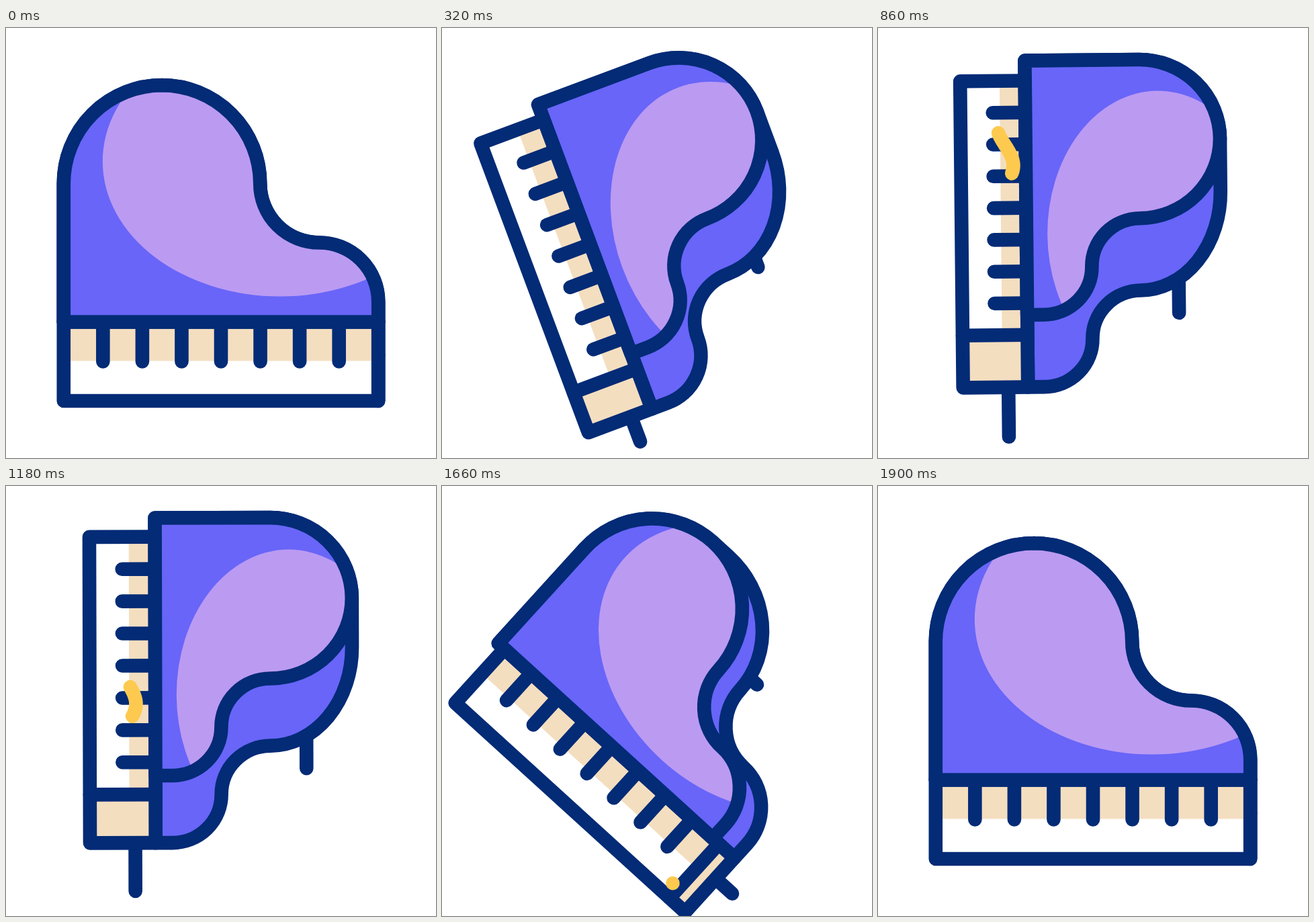
An HTML page with a canvas that plays this animation: 640 px wide and 640 px high, repeating every 2.4 s.

```html
<!DOCTYPE html>
<html lang="en">
<head>
<meta charset="utf-8">
<title>Grand piano</title>
<style>
html, body { margin: 0; width: 100%; height: 100%; overflow: hidden; background: #fff; }
canvas { display: block; }
</style>
</head>
<body>
<canvas width="640" height="640"></canvas>
<script>
const ctx = document.querySelector('canvas').getContext('2d');
const NAVY = '#032b76', BLUE = '#6865f8', LILAC = '#bb9af2', CREAM = '#f4dec0', GOLD = '#fdca4f';
const LOOP = 2400, PI = Math.PI;

const clamp = x => Math.min(1, Math.max(0, x));
const smooth = x => { x = clamp(x); return x * x * (3 - 2 * x); };

function line(x1, y1, x2, y2) {
  ctx.beginPath();
  ctx.moveTo(x1, y1);
  ctx.lineTo(x2, y2);
  ctx.stroke();
}

function box(x, y, w, h, color) {
  ctx.fillStyle = color;
  ctx.fillRect(x, y, w, h);
}

// Weaving path of the highlight over the keys; s runs along the keyboard
function noteAt(s) {
  return [s, 29 * (s / 368) ** 2.5 - 67 - 13 * Math.cos(2 * PI * (s - 2) / 125)];
}

function drawNote(t) {
  if (t < 510 || t > 1680) return;
  const head = 420 * clamp((t - 520) / 1040);
  const tail = Math.min(head, 420 * clamp((t - 691) / 921));
  ctx.strokeStyle = GOLD;
  ctx.beginPath();
  ctx.moveTo(...noteAt(tail));
  for (let i = 1; i <= 24; i++) ctx.lineTo(...noteAt(tail + (head - tail) * i / 24 + 0.01));
  ctx.stroke();
}

function draw(t) {
  const turn = t < 1400 ? smooth(t / 460) : 1 - smooth((t - 1402) / 498);
  const extra = turn * (1 - clamp((t - 540) / 740));
  const depth = turn * (0.16 + 0.018 * turn) + 0.025 * extra;
  const angle = (90 * turn - extra) * PI / 180;

  const kx = 1 - depth, ky = 1 - 0.93 * depth;
  const faceW = 468.4 * kx, fullW = faceW + 395 * depth + 3 * extra, faceH = 117.5 * ky;
  const left = -155 * depth;
  const up = v => -faceH - v * ky;

  // Piano outline: straight left side, round top, S-curve down to the right
  function outline(right, bigR) {
    const waist = right - 176 * kx, r = 88 * kx, ry = 88 * ky, topX = 146.4 * kx, topY = 146.4 * ky;
    ctx.beginPath();
    ctx.moveTo(left, up(0));
    ctx.ellipse(left + topX, up(206), topX, topY, 0, PI, 1.5 * PI);
    ctx.ellipse(waist - bigR, up(206), bigR, topY, 0, -PI / 2, 0);
    ctx.ellipse(waist + r, up(206), r, ry, 0, PI, PI / 2, true);
    ctx.ellipse(waist + r, up(30), r, ry, 0, -PI / 2, 0);
    ctx.lineTo(right, up(0));
    ctx.closePath();
  }

  ctx.setTransform(1, 0, 0, 1, 0, 0);
  box(0, 0, 640, 640, '#fff');
  ctx.translate(320 + turn * (89.7 - 50.2 * turn), 320 + turn * (32.7 * turn - 43.7) + 4 * extra);
  ctx.rotate(angle);
  ctx.translate(-234.2, 235);
  ctx.lineWidth = 20.6;
  ctx.lineCap = ctx.lineJoin = 'round';
  ctx.strokeStyle = NAVY;

  // Legs
  const slide = t < 1400 ? smooth((t - 160) / 320) : turn;
  const foot = fullW + 71 * slide + 5 * extra;
  line(foot - 110, -67.5, foot, -67.5);
  line(foot - 242, -322.5, foot - 182, -322.5);

  // Case
  outline(fullW, 146.4);
  ctx.fillStyle = BLUE;
  ctx.fill();
  ctx.stroke();

  // Keyboard and its side
  box(0, -faceH, faceW, faceH, '#fff');
  box(0, -faceH, faceW, 58 - 105 * depth, CREAM);
  box(faceW, -faceH, fullW - faceW, faceH, CREAM);
  for (let i = 1; i < 8; i++) line(faceW * i / 8, -faceH, faceW * i / 8, up(-59));
  line(faceW, -faceH, faceW, 0);
  ctx.strokeRect(0, -faceH, fullW, faceH);

  // Lid
  outline(faceW + left, 146.4 * kx);
  ctx.fillStyle = BLUE;
  ctx.fill();
  ctx.save();
  ctx.clip();
  ctx.beginPath();
  ctx.ellipse(322 * kx + left, up(239), 264 * kx, 201 * ky, 0, 0, 2 * PI);
  ctx.fillStyle = LILAC;
  ctx.fill();
  ctx.restore();
  outline(faceW + left, 146.4 * kx);
  ctx.stroke();

  drawNote(t);
}

const start = performance.now();
function tick() {
  draw((performance.now() - start) % LOOP);
  requestAnimationFrame(tick);
}
tick();
</script>
</body>
</html>
```
